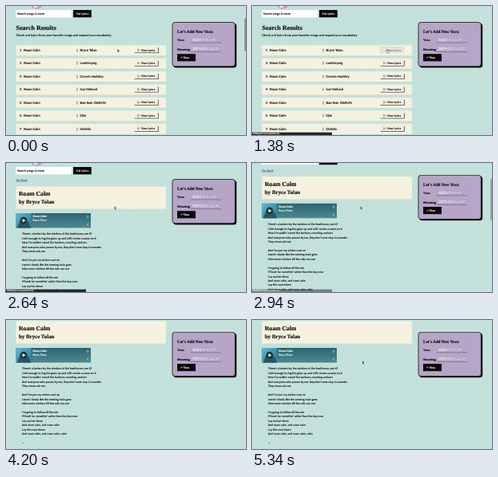
These frames come from a looping animation (300 by 162 pixels, 5400 ms). An HTML page:

```html
<!DOCTYPE html>
<html lang="en">
<head>
<meta charset="utf-8">
<title>Lyrics search</title>
<style>
html, body { margin: 0; width: 100%; height: 100%; overflow: hidden; background: #c2e0da; }
svg { display: block; width: 100vw; height: 100vh; }
text {
  font-family: Lato, sans-serif; color: #0c0c0c; fill: currentColor;
  stroke: currentColor; stroke-width: .13px;
  text-rendering: geometricPrecision; white-space: pre;
}
.serif { font-family: "Liberation Serif", serif; font-weight: 700; }
.jp { font-family: "Noto Sans CJK JP", "Noto Sans CJK", sans-serif; stroke: none; }
.white { color: #fff; }
.bold { font-weight: 700; }
.link { color: #4a57a8; }

.scroll, .stick, .results, .loading, .song, .plain, .hover, .spin,
.url, .wait, .thumb1, .thumb2, .cursor, .arrow, .hand {
  animation: 5.4s linear infinite;
}
.scroll { animation-name: scroll; }
.stick { animation-name: stick; }
.results { animation-name: results; animation-timing-function: step-end; }
.loading { animation-name: loading; animation-timing-function: step-end; }
.song { animation-name: song; animation-timing-function: step-end; }
.plain { animation-name: plain; }
.hover { animation-name: hover; }
.spin { animation-name: spin; transform-origin: 106px 43px; }
.url { animation-name: url; animation-timing-function: step-end; }
.wait { animation-name: wait; }
.thumb1 { animation-name: thumb1; }
.thumb2 { animation-name: thumb2; }
.cursor { animation-name: cursor; }
.arrow { animation-name: arrow; animation-timing-function: step-end; }
.hand { animation-name: hand; animation-timing-function: step-end; }

@keyframes scroll {
  0%, 51.5% { transform: translateY(0); animation-timing-function: cubic-bezier(.3, .3, .5, 1); }
  61.1%, 100% { transform: translateY(-28px); }
}
@keyframes stick {
  0%, 51.5% { transform: translateY(0); }
  53.3%, 100% { transform: translateY(-5.2px); }
}
@keyframes results { 0% { opacity: 1; } 27.78%, 100% { opacity: 0; } }
@keyframes loading { 0% { opacity: 0; } 27.78% { opacity: 1; } 44.44%, 100% { opacity: 0; } }
@keyframes song { 0% { opacity: 0; } 44.44%, 100% { opacity: 1; } }
@keyframes plain { 0%, 14.5% { opacity: 1; } 17%, 100% { opacity: 0; } }
@keyframes hover { 0%, 14.5% { opacity: 0; } 17%, 100% { opacity: .5; } }
@keyframes spin { to { transform: rotate(1620deg); } }
@keyframes url { 0% { opacity: 0; } 15.5% { opacity: 1; } 25%, 100% { opacity: 0; } }
@keyframes wait {
  0%, 24.99% { opacity: 0; }
  25%, 52% { opacity: 1; }
  57%, 100% { opacity: 0; }
}
@keyframes thumb1 { 0%, 5% { opacity: .75; } 10%, 100% { opacity: 0; } }
@keyframes thumb2 {
  0%, 51% { opacity: 0; transform: translateY(0); }
  52% { opacity: .6; }
  61.1%, 72% { opacity: .6; transform: translateY(8px); }
  76%, 100% { opacity: 0; transform: translateY(8px); }
}
@keyframes cursor {
  0%, 5% { transform: translate(139.3px, 54px); animation-timing-function: ease-in-out; }
  16.5%, 28% { transform: translate(168px, 54.5px); }
  33%, 37% { transform: translate(164px, 54.5px); animation-timing-function: ease-in-out; }
  47%, 74% { transform: translate(135.5px, 54.5px); }
  83%, 100% { transform: translate(138px, 51.5px); }
}
@keyframes arrow {
  0% { opacity: 1; }
  14.8% { opacity: 0; }
  27.78% { opacity: 1; }
  74% { opacity: 0; }
  83%, 100% { opacity: 1; }
}
@keyframes hand { 0% { opacity: 0; } 14.8% { opacity: 1; } 27.78%, 100% { opacity: 0; } }
</style>
</head>
<body>
<svg id="stage" viewBox="0 0 300 162" preserveAspectRatio="none">
  <defs>
    <pattern id="grid" width="5.2" height="5.2" patternUnits="userSpaceOnUse">
      <path d="M0 .3H5.2M.3 0V5.2" stroke="#d2e8e4" stroke-width=".4"/>
    </pattern>
    <linearGradient id="sea" x2="0" y2="1">
      <stop stop-color="#2b6570"/><stop offset="1" stop-color="#4f8790"/>
    </linearGradient>
    <linearGradient id="cover" x2="1" y2="1">
      <stop stop-color="#62b9d4"/><stop offset="1" stop-color="#2d7388"/>
    </linearGradient>
  </defs>
</svg>
<script>
const SONG = 'Roam Calm', ARTIST = 'Bryce Tolan';
const CREAM = '#f5f1df', PURPLE = '#b6a5c6';
const artists = [ARTIST, 'Lanternpeg', 'Corwin Hadsley', 'Ivar Stelund', 'Bao feat. DARUN', 'Qim', 'Ordelia'];
const lyrics = [
  "There's a lantern by the window of the boathouse, see it?",
  'Cold enough to fog the glass up and still I wrote a name on it',
  "Now I'm walkin' round the harbour, counting anchors",
  "And everyone who passes by me, they don't ever stop to wonder",
  'They never ask me',
  '',
  "And I've put my winter coat on",
  "Leavin' slowly like the evening train goes",
  'Nine more stations till the rails run out',
  '',
  "I'm going to follow all the rain",
  "I'll look for somethin' softer than the day now",
  'Lay my hat down',
  'And roam calm, and roam calm',
  'Lay this coat down',
  'And roam calm, and roam calm, calm',
  '',
  '...'
];

// y is the vertical middle of the line
const text = (x, y, size, str, cls = '') =>
  `<text x="${x}" y="${y}" dy=".33em" font-size="${size}" class="${cls}">${str}</text>`;
const box = (x, y, w, h, fill, more = '') =>
  `<rect x="${x}" y="${y}" width="${w}" height="${h}" fill="${fill}" ${more}/>`;
const group = (cls, ...parts) => `<g class="${cls}">${parts.join('')}</g>`;
const line = (x1, x2, y, color, w) =>
  `<path d="M${x1} ${y}H${x2}" stroke="${color}" stroke-width="${w}"/>`;

const viewButton = y =>
  box(160.6, y + 2.9, 30, 7, '#222') +
  box(160, y + 2.4, 29.9, 6.9, CREAM) +
  `<path d="M164.6 ${y + 4.7}l2.2 1.4-2.2 1.4z" fill="none" stroke="#111" stroke-width=".35"/>` +
  text(168.6, y + 6.2, 3.6, 'View Lyrics');

const hoverButton = y =>
  box(160.2, y + 2.4, 29.6, 7, '#d8d2d8', 'stroke="#888" stroke-width=".3"') +
  text(168.6, y + 6.2, 3.6, 'View Lyrics');

const row = (artist, i) => {
  const y = 49.2 + i * 16.45;
  const button = i ? viewButton(y) : group('plain', viewButton(y)) + group('hover', hoverButton(y));
  return box(12.5, y, 187.5, 12.9, CREAM) +
    text(17, y + 6.4, 4.2, i + 1) + text(22, y + 6.4, 4.2, SONG) +
    text(88.6, y + 6.4, 4.2, '|') + text(92.5, y + 6.4, 4.2, artist) + button;
};

const header = group('scroll',
  `<ellipse cx="38.5" cy="-1" rx="7" ry="4.6" fill="${PURPLE}"/>`,
  '<ellipse cx="37" cy="-.5" rx="2.6" ry="2.6" fill="#f3f0f5"/>',
  box(12, 5, 70, 9.3, '#fff'), text(14, 9.8, 3.7, 'Search songs &amp; more'),
  box(84, 5, 22.8, 9.3, '#0a0a0a'), text(87.8, 9.8, 3.6, 'Get Lyrics', 'white'));

const results = group('results',
  text(12.5, 27, 8, 'Search Results', 'serif'),
  text(12.5, 36.5, 3.92, 'Check out lyrics from your favorite songs and expand your vocabulary'),
  ...artists.map(row));

const links = (x, names) => names.map((n, i) => text(x, 143.6 + i * 6.9, 3.2, n)).join('');
const loading = group('loading',
  group('spin', `<circle cx="106" cy="43" r="16" fill="none" stroke="${PURPLE}" stroke-width="4"
    stroke-dasharray="25.13" transform="rotate(59 106 43)"/>`),
  text(12, 145, 7.4, 'Quelmi', 'bold'),
  '<circle cx="39.5" cy="145" r="3.6" fill="#e8d33f"/>',
  links(121, ['Pricing', 'About', 'Promo']), links(148.5, ['FAQ', 'Contact', 'News']),
  text(212, 146, 5.4, 'Be a Lyrics Explorer!'),
  box(211.5, 155, 65, 8, '#fff'), text(214, 159.6, 3.2, 'Your email'));

const player =
  box(12.5, 63, 93.5, 18.5, 'url(#sea)') + box(12.5, 63, 19, 18.5, 'url(#cover)') +
  '<path d="M14 81.5l3-8 5-4 6 5 3 7z" fill="#2a5361"/>' +
  '<circle cx="22" cy="72.2" r="4.4" fill="#17343d"/>' +
  '<path d="M20.6 69.9l4 2.3-4 2.3z" fill="#fff"/>' +
  text(33.5, 67, 3.5, SONG, 'white bold') + text(33.5, 71.8, 3.4, ARTIST, 'white') +
  '<circle cx="102" cy="67.3" r="1.1" fill="none" stroke="#d5e5e7" stroke-width=".5"/>' +
  '<path d="M103.2 76l-2.2 1.3 2.2 1.3" fill="none" stroke="#d5e5e7" stroke-width=".6"/>';

const song = group('song', group('scroll',
  text(12.5, 21.5, 3.9, 'Go Back', 'link'), line(12.5, 26.5, 23.6, '#4a57a8', .3),
  box(12.5, 29.3, 187.5, 28.2, CREAM),
  text(16, 38.3, 7.7, SONG, 'serif'), text(16, 49, 6.9, 'by ' + ARTIST, 'serif'),
  player,
  ...lyrics.map((s, i) => text(20, 89.3 + i * 5.44, 3.5, s))));

const field = (y, label, hint) =>
  text(214, y, 4.2, label, 'serif') + text(233, y - .3, 4, hint, 'jp white') +
  line(231, 269, y + 3.2, '#4a3f54', .45);
const panel = group('stick',
  box(209.2, 21.8, 79, 55.6, '#0a0a0a', 'rx="3.5"'),
  box(208, 20.5, 78.3, 55.3, PURPLE, 'rx="3.3" stroke="#111" stroke-width=".8"'),
  text(214, 32.2, 5.2, "Let's Add New Voca", 'serif'),
  field(42.8, 'Voca', '単語をクリック!'), field(54.4, 'Meaning', '説明を記入しよう!'),
  box(214, 60.2, 23, 9.2, '#0a0a0a'), text(218.5, 64.9, 3.6, '+ Voca', 'white serif'));

const status = (cls, w, str) =>
  group(cls, box(0, 158.7, w, 3.3, '#24262a'), text(1, 160.4, 2.6, str, 'white'));

const pointer = group('cursor',
  group('arrow', '<path d="M0 0V3.6L.9 2.9 1.5 4.2 2.1 3.9 1.5 2.6 2.6 2.5z" fill="#111" stroke="#fff" stroke-width=".2"/>'),
  group('hand', '<path d="M.6 0Q1.2-.3 1.4.5V1.7L3 2.1Q3.5 2.3 3.3 3.3L2.9 4.5H1L-.2 2.6Q0 2 .6 2.5z" fill="#fff" stroke="#111" stroke-width=".4"/>'));

document.getElementById('stage').innerHTML += [
  box(0, 0, 300, 162, '#c2e0da'),
  group('scroll', box(0, 0, 300, 192, 'url(#grid)')),
  header, results, loading, song, panel,
  status('url', 72, 'https://www.quelmi.com/lyrics/roam-calm/6417238'),
  status('wait', 100, 'Waiting for www.quelmi.com...'),
  group('thumb1', box(298.3, 15, 1.4, 42, '#555', 'rx=".7"')),
  group('thumb2', box(298.3, 17, 1.4, 52, '#555', 'rx=".7"')),
  pointer
].join('');
</script>
</body>
</html>
```
